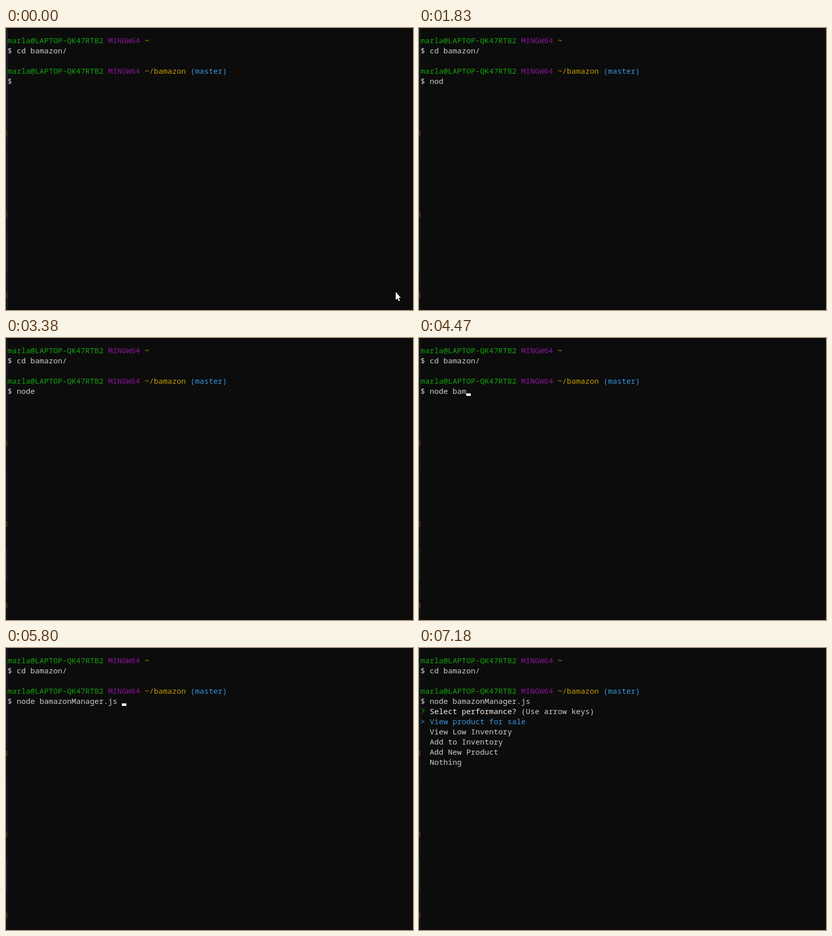
Write an HTML page that moves like this. It is 801 by 555 pixels and loops after 8 s.

```html
<!DOCTYPE html>
<html lang="en">
<head>
<meta charset="utf-8">
<title>Terminal session</title>
<style>
  html, body { margin: 0; width: 100%; height: 100%; overflow: hidden; background: #0c0c0c; }
  svg { display: block; }
  text { font: 15px "Noto Sans Mono", monospace; white-space: pre; fill: #ccc; }
  .green { fill: #13a10e; }
  .purple { fill: #881798; }
  .yellow { fill: #c19c00; }
  .blue { fill: #3a96dd; }
  .bright { fill: #f2f2f2; }
</style>
</head>
<body>
<svg id="stage" width="801" height="555" viewBox="0 0 801 555">
  <g id="edge">
    <rect width="2" height="555" fill="#0c0d10"/>
    <rect width="2" height="198" fill="#0f161f"/>
    <rect y="255" width="2" height="103" fill="#0e151f"/>
    <rect y="415" width="2" height="63" fill="#101d2b"/>
    <rect id="border" x="2" width="1" height="555"/>
    <g fill="#303030">
      <rect y="202" width="3" height="11"/>
      <rect y="361" width="3" height="11"/>
      <rect y="521" width="3" height="11"/>
    </g>
  </g>
  <g id="screen"></g>
  <g id="menu"></g>
  <rect id="caret" width="9" height="5" fill="#f2f2f2"/>
  <path id="pointer" fill="#fff" d="M767 519.5V535l3.4-3.1 2.6 5.6 2.3-1-2.6-5.5H777Z"/>
</svg>
<script>
const LOOP = 8000, LEFT = 3, CELL = 9, ROW = 20, BASE = 30;
const $ = id => document.getElementById(id);
const NS = 'http://www.w3.org/2000/svg';

// Adds one terminal row made of [text, class] runs.
function addRow(parent, row, ...runs) {
  const line = document.createElementNS(NS, 'text');
  line.setAttribute('x', LEFT);
  line.setAttribute('y', BASE + row * ROW);
  for (const [text, cls] of runs) {
    const span = document.createElementNS(NS, 'tspan');
    span.textContent = text;
    if (cls) span.setAttribute('class', cls);
    line.append(span);
  }
  parent.append(line);
  return line;
}

const who = [['marla@LAPTOP-QK47RTB2 ', 'green'], ['MINGW64 ', 'purple']];
const screen = $('screen'), menu = $('menu');
addRow(screen, 0, ...who, ['~', 'yellow']);
addRow(screen, 1, ['$ cd bamazon/']);
addRow(screen, 3, ...who, ['~/bamazon ', 'yellow'], ['(master)', 'blue']);
const input = addRow(screen, 4, ['$ ']);

addRow(menu, 5, ['? ', 'green'], ['Select performance? ', 'bright'], ['(Use arrow keys)']);
addRow(menu, 6, ['> View product for sale', 'blue']);
['View Low Inventory', 'Add to Inventory', 'Add New Product', 'Nothing']
  .forEach((item, i) => addRow(menu, 7 + i, ['  ' + item]));

// Time, typed text, caret shown, caret on the next row.
const command = 'node bamazonManager.js ';
const steps = [
  [0, '', 0], [190, '', 1], [730, '', 0],
  [1130, 'n', 1], [1280, 'no', 1], [1740, 'nod', 1], [1830, 'nod', 0],
  [1980, 'node ', 1], [2300, 'node ', 0],
  [2610, 'node m', 1], [2680, 'node ma', 1], [2840, 'node ma', 0],
  [3150, 'node m', 1], [3320, 'node ', 1], [3380, 'node ', 0],
  [3920, 'node ', 1], [4000, 'node b', 1], [4070, 'node ba', 1],
  [4390, 'node ba', 0], [4470, 'node bam', 1],
  [4640, 'node bamazon', 1], [4930, 'node bamazon', 0], [5480, 'node bamazon', 1],
  [5570, 'node bamazonM', 1],
  [5800, command, 1], [6030, command, 0],
  [6180, command, 1, 1], [6570, command, 0, 1], [7030, command, 1, 1], [7180, command, 0, 1]
];

const show = (el, on) => el.setAttribute('visibility', on ? 'visible' : 'hidden');

function draw(t) {
  const [, typed, lit, below] = steps.findLast(s => s[0] <= t);
  const text = '$ ' + typed;
  if (input.textContent !== text) input.textContent = text;

  const caret = $('caret');
  caret.setAttribute('x', LEFT + (below ? 0 : text.length * CELL));
  caret.setAttribute('y', below ? 129 : 109);
  show(caret, lit);

  show(menu, t >= 7180);
  show($('pointer'), t < 70);
  $('border').setAttribute('fill', t < 70 ? '#2b333d' : '#1a1d21');
}

const start = performance.now();
function tick() {
  draw((performance.now() - start) % LOOP);
  requestAnimationFrame(tick);
}
tick();
</script>
</body>
</html>
```
